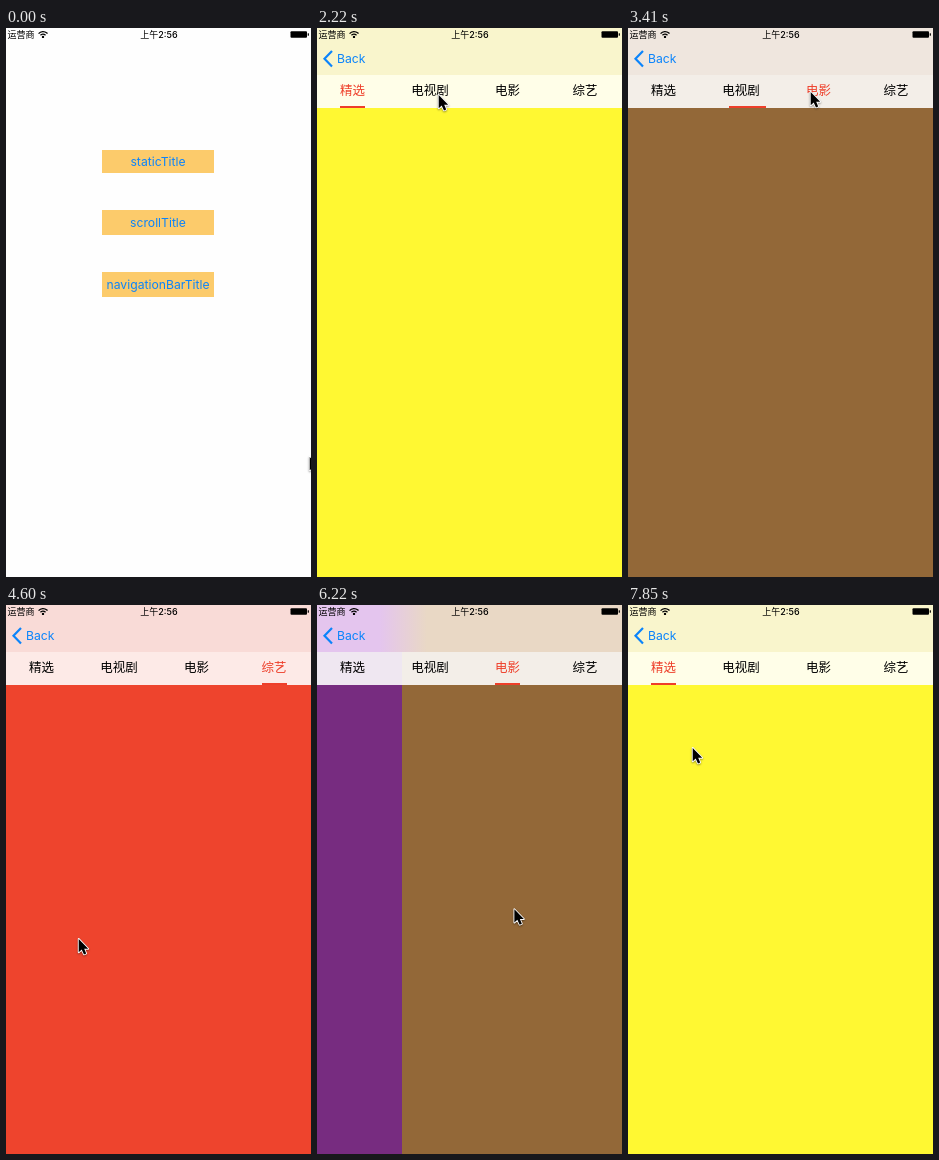
An HTML page with a canvas for the animation above (8 s loop, 305x549 px).

```html
<!DOCTYPE html>
<html lang="zh">
<head>
<meta charset="utf-8">
<style>
html, body { margin: 0; height: 100%; overflow: hidden; background: #fefefe; }
canvas { display: block; }
</style>
</head>
<body>
<canvas width="305" height="549"></canvas>
<script>
const W = 305, H = 549, LOOP = 8000, TICKS = 54;
const NAV = 47, BAR = 80, GLYPH = 12.5;
const PUSH = 9, SWIPE = 4.6;
const BLUE = '#0b84fb', RED = '#ee3f2a';
const CJK = '"Noto Sans CJK SC", "Noto Sans CJK", sans-serif';
const SANS = 'Inter, ' + CJK;
const c = document.querySelector('canvas').getContext('2d');

const buttons = [['staticTitle', 122, 23], ['scrollTitle', 182, 25], ['navigationBarTitle', 244, 25]];

// calm: bar tint at rest, vivid: bar tint while pages slide
const pages = [
  { name: '精选', color: '#fff832', calm: '#f9f5cc', vivid: '#fbf3a2' },
  { name: '电视剧', color: '#772c80', calm: '#ebddee', vivid: '#e4c5ee' },
  { name: '电影', color: '#936838', calm: '#efe6de', vivid: '#e9d8c5' },
  { name: '综艺', color: '#ee442d', calm: '#f9dbd7', vivid: '#fbc8be' }
];
pages.forEach((g, i) => {
  g.mid = 35.6 + 77.5 * i;
  g.w = GLYPH * g.name.length;
  g.x = g.mid - g.w / 2;
});

// A tap jumps to its page at once; a swipe slides there and settles at its tick.
const picks = [
  { tick: 18, to: 1 }, { tick: 23, to: 2 }, { tick: 27, to: 3 },
  { tick: 39, to: 2, swipe: true }, { tick: 45, to: 1, swipe: true }, { tick: 51, to: 0, swipe: true }
];

// Pointer moves: from tick, until tick, x, y
const moves = [
  [1, 7, 147, 135], [10, 15, 121, 66], [18, 21, 182, 63], [24, 27, 265, 66],
  [27, 31, 72, 333], [34, 37, 212, 316], [38, 40, 110, 304], [40, 43, 227, 303],
  [44, 47, 75, 205], [47, 50, 190, 175], [50, 53, 64, 142]
];

const mix = (a, b, p) => a + (b - a) * p;

function ease(u) {
  u = Math.max(0, Math.min(1, u));
  return u * u * (3 - 2 * u);
}

function pointerAt(tick) {
  let x = 303, y = 428;
  for (const [from, until, toX, toY] of moves) {
    const p = ease((tick - from) / (until - from));
    x = mix(x, toX, p);
    y = mix(y, toY, p);
  }
  return [x, y];
}

function pagerAt(tick) {
  const s = { pos: 0, active: 0, x: pages[0].x, w: pages[0].w };
  for (const { tick: at, to, swipe } of picks) {
    if (swipe) s.pos = mix(s.pos, to, ease((tick - at + SWIPE) / SWIPE));
    if (tick < at) continue;
    const p = ease(.17 + (tick - at) * .5);
    s.pos = s.active = to;
    s.x = mix(s.x, pages[to].x, p);
    s.w = mix(s.w, pages[to].w, p);
  }
  return s;
}

function rect(x, y, w, h, fill) {
  c.fillStyle = fill;
  c.fillRect(x, y, w, h);
}

function text(str, x, y, font, fill, align = 'left') {
  c.font = font;
  c.fillStyle = fill;
  c.textAlign = align;
  c.fillText(str, x, y);
}

function fade(x0, x1, a, b) {
  const g = c.createLinearGradient(x0, 0, x1, 0);
  g.addColorStop(0, a);
  g.addColorStop(1, b);
  return g;
}

function drawHome(p, tick) {
  const dx = Math.round(-.3 * W * p);
  rect(0, 0, W, H, '#fefefe');
  buttons.forEach(([label, y, h], i) => {
    rect(96 + dx, y, 112, h, '#fccb6b');
    if (i === 0 && tick >= PUSH) c.globalAlpha = Math.min(1, .2 + .4 * (tick - PUSH));
    text(label, 152 + dx, y + h / 2 + 4.5, '12.2px ' + SANS, BLUE, 'center');
    c.globalAlpha = 1;
  });
  rect(0, 0, W, H, `rgba(0,0,0,${.1 * p})`);
}

function drawPager(left, { pos, active, x, w }) {
  const dx = left * .035;
  if (left > 0) rect(left - 5, NAV, 5, H, fade(left - 5, left, 'rgba(0,0,0,0)', 'rgba(0,0,0,.08)'));
  c.save();
  c.translate(left, 0);
  pages.forEach((g, i) => rect(Math.round((i - pos) * W), NAV, W, H, g.color));
  rect(0, NAV, W, BAR - NAV, 'rgba(255,255,255,.885)');
  pages.forEach((g, i) =>
    text(g.name, g.mid + dx, 67, GLYPH + 'px ' + CJK, i === active ? RED : '#000', 'center'));
  rect(Math.round(x + dx), 78, Math.round(w), 2, RED);
  c.restore();
}

function drawNav(p, left, pos) {
  const i = Math.floor(pos), a = pages[i], b = pages[Math.min(i + 1, 3)];
  const tint = Math.abs(pos - Math.round(pos)) > .13 ? 'vivid' : 'calm';
  const edge = (i + 1 - pos) * W;
  let fill = a.calm;
  if (left > 0) fill = fade(left - 25, left + 25, '#f5f5f5', a.vivid);
  else if (pos > i) fill = fade(edge - 22, edge + 25, a[tint], b[tint]);
  rect(0, 0, W, NAV, fill);

  c.globalAlpha = p ** 5;
  c.strokeStyle = BLUE;
  c.lineWidth = 2.2;
  c.beginPath();
  c.moveTo(15, 23);
  c.lineTo(7.5, 30.7);
  c.lineTo(15, 38.4);
  c.stroke();
  c.globalAlpha = p;
  text('Back', 20 + 118 * (1 - p), 35.3, '12.2px ' + SANS, BLUE);
  c.globalAlpha = 1;
}

function drawStatus() {
  text('运营商', 1.5, 10, '9px ' + CJK, '#000');
  text('上午2:56', 153, 10, '500 9px ' + SANS, '#000', 'center');
  c.strokeStyle = '#000';
  c.lineWidth = 1.3;
  for (const r of [3.4, 5.9]) {
    c.beginPath();
    c.arc(37, 9.5, r, -Math.PI * .77, -Math.PI * .23);
    c.stroke();
  }
  c.beginPath();
  c.arc(37, 8.9, 1.2, 0, 7);
  c.fill();
  c.beginPath();
  c.roundRect(284.5, 3.3, 16.5, 6.4, 1);
  c.fill();
  rect(301.7, 5.3, 1.2, 2.4, '#000');
}

function drawPointer([x, y]) {
  c.save();
  c.translate(x, y);
  c.beginPath();
  [[.7, 1], [.7, 14.3], [3.7, 11.6], [6, 16.4], [8.2, 15.5], [6.2, 10.8], [10.2, 10.8]]
    .forEach(q => c.lineTo(...q));
  c.closePath();
  c.lineJoin = 'round';
  c.lineWidth = 1.8;
  c.strokeStyle = '#fff';
  c.shadowColor = 'rgba(0,0,0,.4)';
  c.shadowBlur = 2;
  c.shadowOffsetY = 1;
  c.stroke();
  c.shadowColor = 'transparent';
  c.fillStyle = '#000';
  c.fill();
  c.restore();
}

function draw(now) {
  // the screen refreshes in even steps; 5 ms absorbs rounding
  const tick = Math.floor((now + 5) % LOOP / LOOP * TICKS);
  const p = 1 - .279 ** Math.max(0, tick - PUSH);
  const left = Math.round(W * (1 - p));
  const pager = pagerAt(tick);
  drawHome(p, tick);
  if (p > 0) {
    drawPager(left, pager);
    drawNav(p, left, pager.pos);
  }
  drawStatus();
  drawPointer(pointerAt(tick));
}

const begin = performance.now();
function loop() {
  draw(performance.now() - begin);
  requestAnimationFrame(loop);
}
loop();
</script>
</body>
</html>
```
